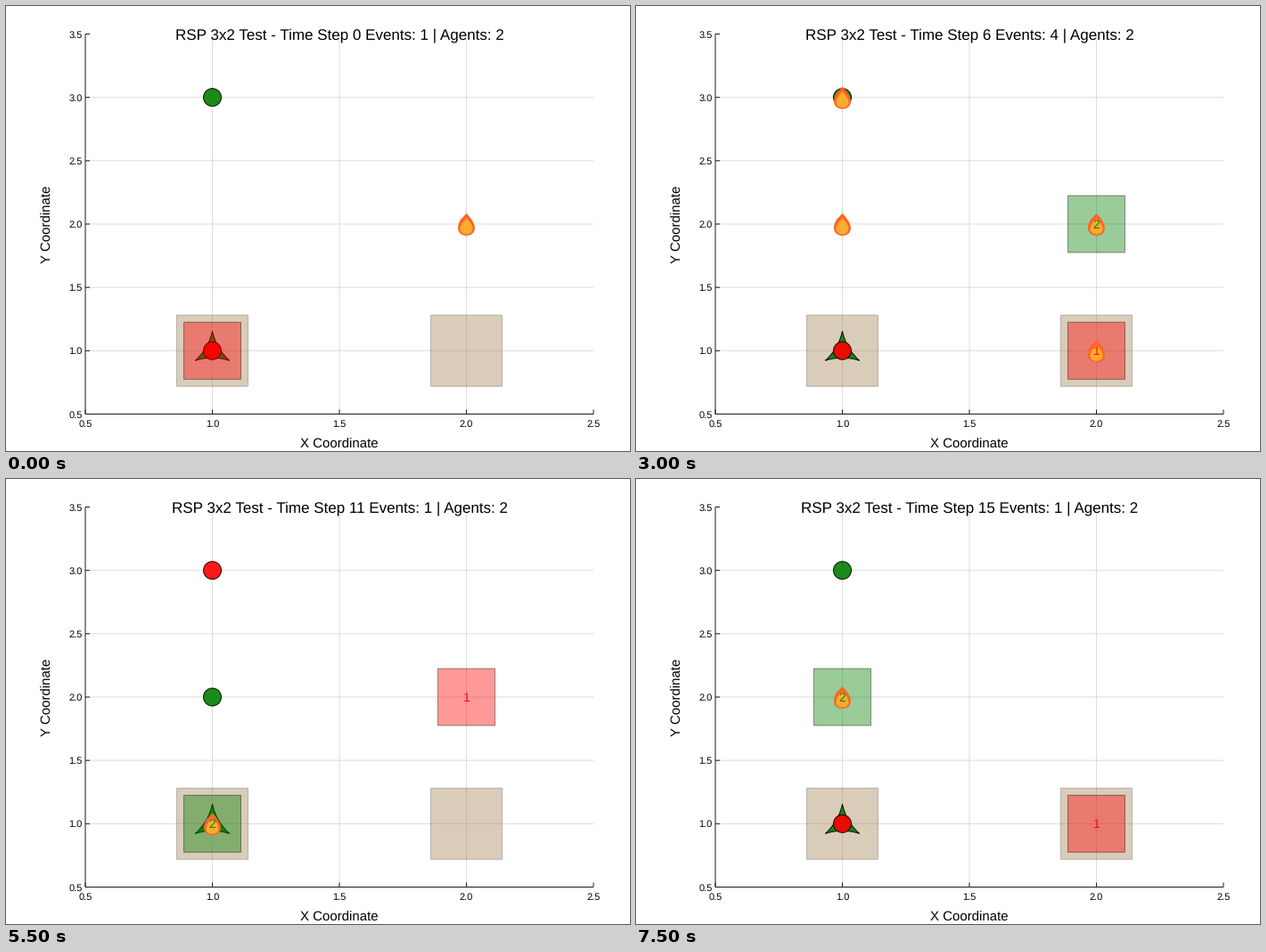
These frames come from a looping animation (700 px wide and 500 px high, 8000 ms). A matplotlib script:

```python
import matplotlib.pyplot as plt
from matplotlib.animation import FuncAnimation
from matplotlib.patches import Circle, Polygon, Rectangle
import numpy as np

W, H, DPI = 700, 500, 100
PX = 72 / DPI
STEPS, STEP_MS = 16, 500
LEARNED = 8  # step from which the agents follow their final policy

RED, GREEN = (1, 0, 0), (0, 0.5, 0)
TAN, INK, GRID = (0.627, 0.5, 0.314), "#1a1a1a", "#dcdcdc"
FLAME, GLOW = "#ff6426", "#ffab2f"
BASE = (1, 1)

plt.rcParams.update({
    "font.family": "Liberation Sans",
    "text.hinting": "no_hinting",
    "path.snap": False,
})

fig = plt.figure(figsize=(W / DPI, H / DPI), dpi=DPI, facecolor="white")
ax = fig.add_axes([0, 0, 1, 1])
ax.set(xlim=(0, W), ylim=(H, 0))
ax.axis("off")


def sx(v):
    return 89 + (v - 0.5) * 285


def sy(v):
    return 458.5 - (v - 0.5) * 427 / 3


def at(cell):
    return np.array([sx(cell[0]), sy(cell[1])])


def label(x, y, s, px, **kw):
    kw = {"ha": "center", "va": "baseline", **kw}
    return ax.text(x, y, s, fontsize=px * PX, **kw)


def line(xs, ys, color, z):
    ax.plot(xs, ys, color=color, lw=PX, zorder=z, solid_capstyle="butt")


def draw_axes():
    left, right, top, bottom = sx(0.5), sx(2.5), sy(3.5), sy(0.5)
    for v in np.arange(0.5, 2.6, 0.5):
        x = sx(v)
        if 0.5 < v < 2.5:
            line([x, x], [top, bottom], GRID, 1)
        line([x, x], [bottom - 5, bottom], INK, 8)
        label(x, 473, f"{v:.1f}", 11)
    for v in np.arange(0.5, 3.6, 0.5):
        y = sy(v)
        if 0.5 < v < 3.5:
            line([left, right], [y, y], GRID, 1)
        line([left, left + 5], [y, y], INK, 8)
        label(85.5, y + 4, f"{v:.1f}", 11, ha="right")
    line([left, left], [top, bottom], INK, 8)
    line([left, right], [bottom, bottom], INK, 8)
    label(374, 497, "X Coordinate", 15)
    label(51, 245.5, "Y Coordinate", 15, rotation=90, rotation_mode="anchor")


def square(cell, half, rgb, edge):
    return Rectangle(at(cell) - half, 2 * half, 2 * half,
                     fc=(*rgb, 0.4), ec=(*edge, 0.4), lw=PX)


def star(cell, tip=22, dip=8):
    """Three points joined by inward-bending sides."""
    a = np.linspace(0, 2 * np.pi, 121)
    s = (a * 3 / (2 * np.pi)) % 1
    ends = np.floor(a * 3 / (2 * np.pi) + 1e-9) * 2 * np.pi / 3
    point = lambda r, ang: r * np.array([np.sin(ang), -np.cos(ang)])
    bend = 2 * dip - tip / 2
    pts = ((1 - s) ** 2 * point(tip, ends)
           + 2 * s * (1 - s) * point(bend, ends + np.pi / 3)
           + s ** 2 * point(tip, ends + 2 * np.pi / 3))
    return Polygon(pts.T + at(cell), fc=(*GREEN, 0.9), ec=(0, 0, 0, 0.9), lw=PX)


def drop(cell, dx, half, top, bottom, color):
    """Teardrop with its tip up; top and bottom are offsets from the cell."""
    t = np.linspace(0, 2 * np.pi, 60)
    x = dx + half / 0.77 * np.sin(t) * np.sin(t / 2)
    y = (top + bottom) / 2 - (bottom - top) / 2 * np.cos(t)
    return Polygon(np.column_stack([x, y]) + at(cell), fc=color, lw=0)


def fire(cell):
    return [drop(cell, 0, 9.4, -12, 13, FLAME),
            drop(cell, -5.3, 4, -7, 9, FLAME),
            drop(cell, 0, 7, -6.5, 11.5, GLOW)]


def agents(step):
    """Both agents climb the left column, one cell per step."""
    return (1, 1 + step % 3), (1, 1 + (step + 2) % 3)


def targets(step):
    if step == 0:
        return BASE, None
    late = step >= LEARNED
    (_, ry), (_, gy) = agents(step)
    red = (2, 1 + (ry + late >= 3))
    green = (1 + ((gy > 1) != late), gy - 1 if gy > 1 else 1 + late)
    return red, green


def events(step):
    if step == 0:
        return [(2, 2)]
    below = agents(step)[1][1] - 1
    trailing = [(1, below)] if below else []
    lasting = [(1, 3), (2, 2), (2, 1)] if step < LEARNED else []
    return trailing + lasting


draw_axes()
for x in (1, 2):
    ax.add_patch(square((x, 1), 40, TAN, (0.4, 0.4, 0.4))).set_zorder(2)
ax.add_patch(star(BASE)).set_zorder(3)
title = label(374, 37, "", 17, zorder=9)
live = []


def add(patch, z):
    patch.set_zorder(z)
    live.append(ax.add_patch(patch))


def update(step):
    while live:
        live.pop().remove()
    fires = events(step)
    title.set_text(f"RSP 3x2 Test - Time Step {step} "
                   f"Events: {len(fires)} | Agents: 2")
    rows = zip(agents(step), targets(step), (RED, GREEN))
    for n, (pos, aim, rgb) in enumerate(rows, 1):
        add(Circle(at(pos), 10, fc=(*rgb, 0.9), ec=(0, 0, 0, 0.9), lw=PX), 4)
        if aim:
            add(square(aim, 32, rgb, (0, 0, 0)), 5)
            x, y = at(aim)
            live.append(label(x, y + 5, str(n), 14, color=rgb,
                              alpha=0.9, zorder=7))
    for cell in fires:
        for part in fire(cell):
            add(part, 6)
    return [title, *live]


anim = FuncAnimation(fig, update, frames=STEPS, interval=STEP_MS,
                     init_func=lambda: update(0), repeat=True,
                     repeat_delay=0, blit=False)
plt.show()
```
